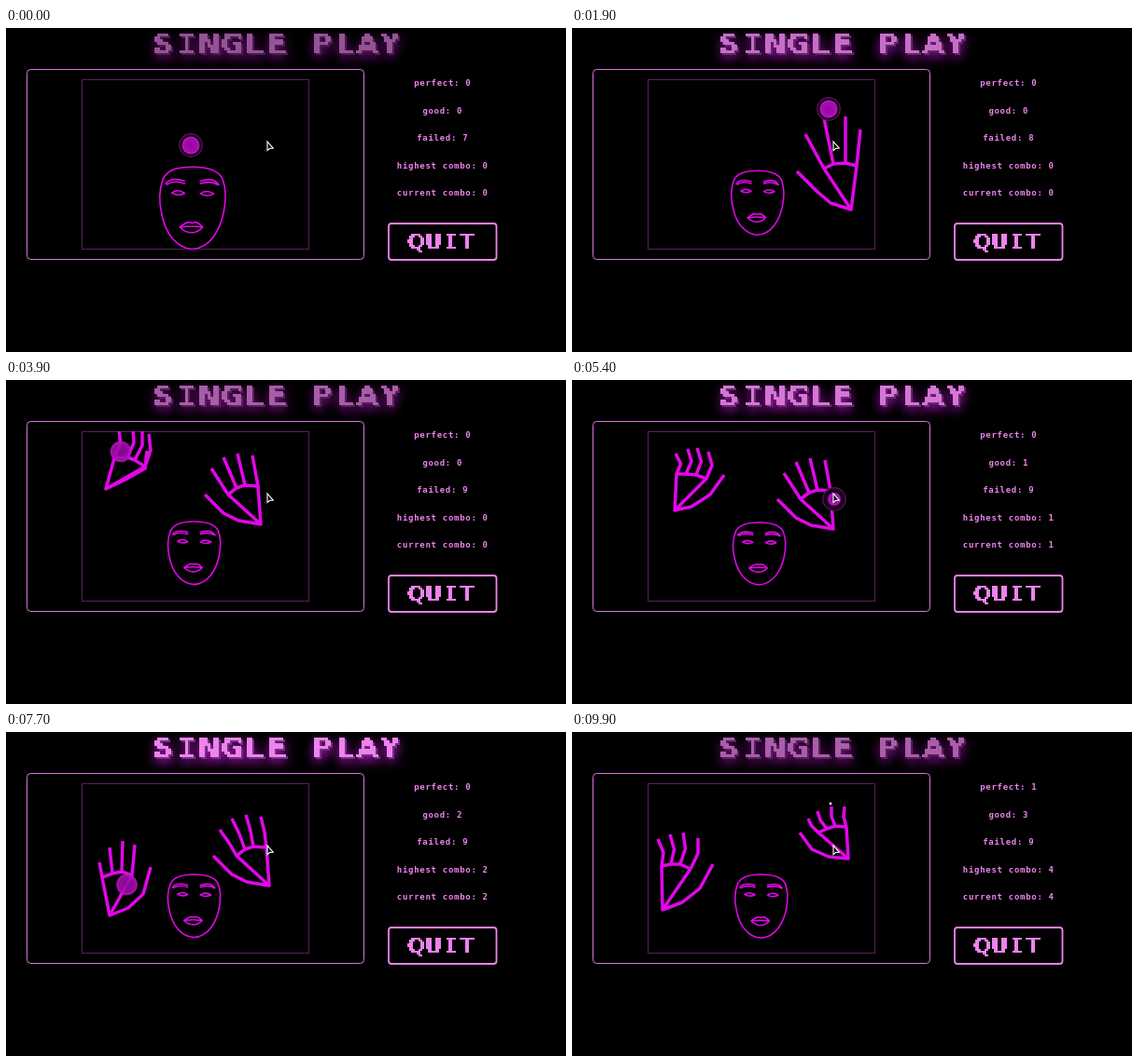
These frames come from a looping animation (600x348 px, 10000 ms). An HTML page:

```html
<!DOCTYPE html>
<html lang="en">
<head>
<meta charset="utf-8">
<title>Single play</title>
<style>
  html, body { margin: 0; width: 100%; height: 100%; overflow: hidden; background: #000; }
  svg { display: block; width: 600px; height: 348px; }
  .big { font: bold 30px "DejaVu Sans", sans-serif; }
  .quit { font-size: 23px; }
  .slab { font-family: "DejaVu Sans Mono", monospace; }
  .stats { font: bold 9px "DejaVu Sans Mono", monospace; letter-spacing: .7px; }
  .big, .stats { fill: #ee82ee; text-anchor: middle; }
  #title { filter: drop-shadow(2px 2px 0 #70307a) drop-shadow(0 4px 6px #a010b0); }
  .line { fill: none; stroke: #e206ea; stroke-linejoin: round; }
  #face path { vector-effect: non-scaling-stroke; stroke-width: 1.6; }
  .hand { stroke-width: 3.5; }
</style>
</head>
<body>
<svg viewBox="0 0 600 348">
  <defs>
    <!-- Block lettering: sample one point per cell, then grow it to fill the cell -->
    <filter id="block3" filterUnits="userSpaceOnUse" x="150" y="0" width="282" height="39" color-interpolation-filters="sRGB">
      <feFlood x="151" y="1" width="1" height="1"/>
      <feOffset x="150" y="0" width="3" height="3"/>
      <feTile result="dots"/>
      <feComposite in="SourceGraphic" in2="dots" operator="in"/>
      <feComponentTransfer><feFuncA type="discrete" tableValues="0 1"/></feComponentTransfer>
      <feMorphology operator="dilate" radius="1"/>
    </filter>
    <filter id="block2" filterUnits="userSpaceOnUse" x="420" y="211" width="100" height="36" color-interpolation-filters="sRGB">
      <feFlood x="420" y="211" width="1" height="1"/>
      <feOffset x="420" y="211" width="2" height="2"/>
      <feTile result="dots"/>
      <feComposite in="SourceGraphic" in2="dots" operator="in"/>
      <feComponentTransfer result="a"><feFuncA type="discrete" tableValues="0 1"/></feComponentTransfer>
      <feOffset in="a" dx="1" result="b"/>
      <feMerge result="c"><feMergeNode in="a"/><feMergeNode in="b"/></feMerge>
      <feOffset in="c" dy="1" result="d"/>
      <feMerge><feMergeNode in="c"/><feMergeNode in="d"/></feMerge>
    </filter>
    <radialGradient id="glow">
      <stop offset="0" stop-color="#94099c"/>
      <stop offset=".7" stop-color="#a40cae"/>
      <stop offset="1" stop-color="#c014ca"/>
    </radialGradient>
    <clipPath id="stage"><rect x="81" y="55" width="244" height="183.5"/></clipPath>
  </defs>

  <g id="title">
    <text class="big" filter="url(#block3)" y="27"
      x="168 193 217.5 242 266 290.5 314 338 363 387 411.5">S<tspan class="slab">I</tspan>NGLE PLAY</text>
  </g>

  <rect x="22.5" y="44.5" width="361" height="204" rx="4" fill="none" stroke="#d878dc"/>
  <rect x="81.5" y="55.5" width="243" height="182" fill="none" stroke="#562059"/>
  <g clip-path="url(#stage)">
    <g id="face" class="line">
      <path d="M28 0C40 0 50 2 54 10C57 18 57 28 55 38C52 52 44 68 28 69C14 68 5 55 2 40C-1 28 0 18 3 10C7 2 16 0 28 0Z"/>
      <path d="M5 14.5Q9 8 22 11.8M6 15Q12 10.5 22 14M34.5 12Q47 8 51 15.5M34.5 14Q44 11 50 15"/>
      <path d="M10.5 21.7Q15.5 18 21.5 22Q16 25 10.5 21.7ZM35 22.3Q40.5 18.6 46.4 22.4Q40.5 25.6 35 22.3Z"/>
      <path d="M17.5 50.5Q23 46 26 46.4L28 47L30 46.4Q33 46 37 50.5Q33 55 27.5 55Q22 55 17.5 50.5ZM18 50.5Q27 49 37 50.5"/>
    </g>
    <path id="left" class="line hand"/>
    <path id="right" class="line hand"/>
    <g id="target">
      <circle id="ring" r="12.2" fill="#180319" stroke="#561058" stroke-width="1.4"/>
      <circle id="core" fill="url(#glow)"/>
    </g>
    <circle id="spark" r="1.4" fill="#f4dff4"/>
  </g>
  <path d="M280 122V131.6L282.6 129.4L286.2 129.1Z" fill="#000" stroke="#fff" stroke-width="1.1"/>

  <g id="stats" class="stats"></g>
  <rect x="410" y="210" width="115.5" height="39" rx="3" fill="none" stroke="#ee82ee" stroke-width="1.8"/>
  <text class="big quit" filter="url(#block2)" y="237" x="439 457.5 476 494">QU<tspan class="slab">I</tspan>T</text>
</svg>
<script>
const LOOP = 10000, STEP = 100;
const $ = id => document.getElementById(id);
const mix = (a, b, k) => a + (b - a) * k;
const clamp = v => Math.min(1, Math.max(0, v));

// Rows are [time, ...values]; returns the values blended at time t.
function at(rows, t) {
  let i = 0;
  while (i < rows.length - 2 && t >= rows[i + 1][0]) i++;
  const a = rows[i], b = rows[i + 1];
  const k = clamp((t - a[0]) / (b[0] - a[0]));
  return a.slice(1).map((v, n) => mix(v, b[n + 1], k));
}

// Hand shapes relative to the wrist: three thumb joints,
// then base and tip of index, middle, ring and little finger.
const open = [-22,-7, -37,-20, -58,-41, -29,-44, -49,-81, -19,-49, -29,-98, -6,-50, -6,-100, 6,-47, 10,-86];
const tilted = [-24,-4, -40,-12, -60,-32, -35,-32, -53,-60, -26,-39, -40,-72, -17,-42, -25,-76, -3,-41, -9,-74];
const small = [-21,-2, -39,-10, -52,-28, -32,-28, -43,-43, -23,-32, -33,-51, -14,-35, -18,-56, -2,-34, -4,-56];
const high = [21,-10, 42,-22, 44,-41, 42,-24, 46,-59, 31,-31, 39,-63, 23,-34, 29,-65, 9,-33, 14,-65];
const curled = [18,-4, 38,-17, 53,-38, 34,-34, 36,-63, 23,-38, 24,-67, 12,-39, 14,-66, 2,-39, 1,-61];
const flat = [20,-8, 36,-23, 44,-52, 24,-43, 27,-76, 13,-47, 14,-80, 3,-45, 0,-73, -8,-41, -11,-57];
const wide = [21,-8, 40,-23, 54,-49, 30,-44, 38,-77, 19,-49, 22,-83, 9,-49, 8,-81, -1,-47, -5,-76];

// time, wrist x, wrist y, finger bend, shape
const rightKeys = [
  [900, 285, 236, 0, ...open], [1900, 299, 195, 0, ...open],
  [3900, 273, 155, 0, ...tilted], [5400, 280, 160, 0, ...tilted],
  [7700, 282, 165, 1, ...tilted], [8800, 283, 165, 1, ...tilted],
  [9900, 296, 136, -2, ...small]
];
const leftKeys = [
  [2100, 90, 236, 3, ...wide], [3300, 104, 226, 3, ...wide],
  [3900, 107, 117, 4, ...high], [5400, 110, 140, 5, ...curled],
  [6600, 114, 160, 4, ...curled], [7700, 111, 197, 0, ...flat],
  [8800, 105, 188, 4, ...wide], [9900, 97, 191, 4, ...wide]
];
// time, x, y, scale x, scale y
const faceKeys = [
  [0, 164.5, 149.3, 1.25, 1.28], [1000, 170, 153, 1.02, 1.01],
  [1900, 170.5, 153.3, 1, 1], [3900, 173.3, 152, 1, .98], [5400, 172.3, 153, 1, .97],
  [7700, 173.2, 153, 1, .98], [8800, 174, 153.3, 1, .98], [9900, 174.5, 153, 1, .99]
];
const titleKeys = [[0, .63], [1900, .84], [3900, .71], [5400, .9], [7700, 1], [8800, .95], [9900, .72], [10000, .63]];

// start, end, x, y, result
const targets = [
  [-1150, 300, 198, 126, "failed"], [700, 2150, 275, 87, "failed"],
  [2600, 4000, 123, 77, "good"], [4560, 5900, 281, 128, "good"],
  [6450, 7800, 129.5, 164, "good"], [8500, 9850, 281, 75.5, "perfect"]
];

const labels = ["perfect", "good", "failed", "highest combo", "current combo"];
const rows = labels.map((_, i) => {
  const el = document.createElementNS("http://www.w3.org/2000/svg", "text");
  el.setAttribute("x", 467.8);
  el.setAttribute("y", 62 + i * 29.6);
  return $("stats").appendChild(el);
});

function set(el, attrs) {
  for (const name in attrs) el.setAttribute(name, attrs[name]);
}

function drawHand(el, keys, t) {
  if (t < keys[0][0]) return set(el, { d: "" });
  const [x, y, bend, ...s] = at(keys, t);
  const p = [[x, y]];
  for (let i = 0; i < s.length; i += 2) p.push([x + s[i], y + s[i + 1]]);
  const line = pts => "M" + pts.map(q => q.map(v => v.toFixed(1)).join(" ")).join("L");
  let d = line(p.slice(0, 4)) + line([p[0], p[4], p[6], p[8], p[10]]) + "Z";
  for (let i = 4; i < 12; i += 2) {
    const [a, b] = [p[i], p[i + 1]];
    d += line([a, [mix(a[0], b[0], .5) + bend, mix(a[1], b[1], .5)], b]);
  }
  set(el, { d });
}

function drawTarget(t) {
  const now = targets.find(([from, to]) => t >= from && t < to);
  $("target").style.display = now ? "" : "none";
  if (now) {
    const [from, to, x, y, result] = now, age = t - from;
    const swell = clamp((age - 1200) / 50);
    const fade = result === "failed" ? clamp((to - t) / 250) : 1;
    set($("target"), { transform: `translate(${x} ${y})`, opacity: fade });
    set($("ring"), { opacity: clamp(age / 200) * (1 - swell) });
    set($("core"), { r: 9.5 * clamp(age / 1150) + 1.8 * swell, opacity: 1 - .12 * swell });
  }
  const hit = targets.find(g => g[4] !== "failed" && t >= g[1] && t < g[1] + 150);
  $("spark").style.display = hit ? "" : "none";
  if (hit) set($("spark"), { cx: hit[2] - 4, cy: hit[3] + 1.5 });
}

function drawStats(t) {
  const count = name => targets.filter(g => g[4] === name && t >= g[1]).length;
  const perfect = count("perfect"), good = count("good"), combo = perfect + good;
  [perfect, good, 7 + count("failed"), combo, combo].forEach((n, i) => {
    rows[i].textContent = `${labels[i]}: ${n}`;
  });
}

function draw(t) {
  $("title").style.opacity = at(titleKeys, t)[0];
  const [x, y, sx, sy] = at(faceKeys, t);
  set($("face"), { transform: `translate(${x} ${y}) scale(${sx} ${sy})` });
  drawHand($("left"), leftKeys, t);
  drawHand($("right"), rightKeys, t);
  drawTarget(t);
  drawStats(t);
}

const begin = performance.now();
function tick() {
  const t = (performance.now() - begin) % LOOP;
  draw(Math.floor(t / STEP) * STEP);
  requestAnimationFrame(tick);
}
tick();
</script>
</body>
</html>
```
